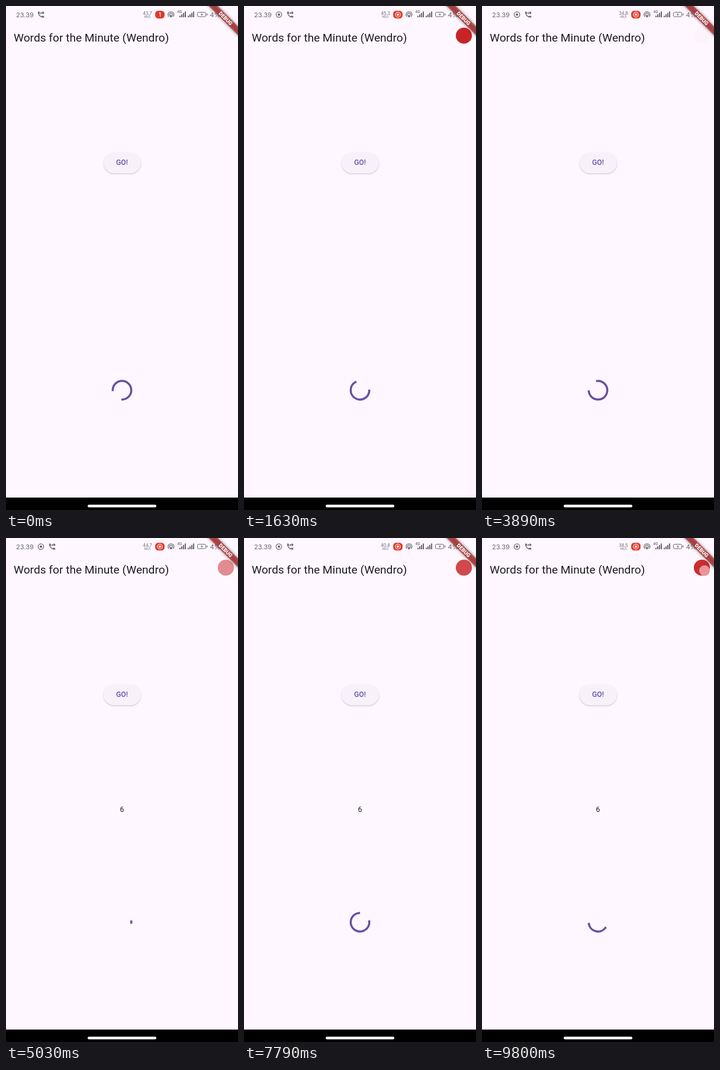
Write an HTML page that moves like this. It is 392 by 850 pixels and loops after 9.82 s.

```html
<!DOCTYPE html>
<html lang="en">
<head>
<meta charset="utf-8">
<title>Future demo</title>
<style>
  html, body { margin: 0; width: 100%; height: 100%; overflow: hidden; background: #fef7ff; }
  svg { display: block; width: 392px; height: 850px; font-family: Roboto, sans-serif; }
  .status { font-family: Inter, sans-serif; fill: #6a666e; }
  .line { fill: none; stroke: #6a666e; }
</style>
</head>
<body>
<svg viewBox="0 0 392 850">
  <defs>
    <filter id="blur" x="-50%" y="-100%" width="200%" height="300%"><feGaussianBlur stdDeviation="2.6"/></filter>
    <filter id="soft" x="-20%" y="-20%" width="140%" height="150%"><feGaussianBlur stdDeviation="0.8"/></filter>
  </defs>
  <rect width="392" height="850" fill="#fef7ff"/>

  <g class="status">
    <text x="17" y="19" font-size="11">23.39</text>
    <g id="rec">
      <circle class="line" cx="59" cy="14.5" r="4.7" stroke-width="1.2"/>
      <circle cx="59" cy="14.5" r="2.1"/>
    </g>
    <g id="phone">
      <path class="line" d="M-4.4 -4.2 C-4.2 0.8 -0.8 4.2 4.4 4.4" stroke-width="1.6"/>
      <path d="M-5.2 -5 h2.7 l.7 3 -1.9 1.4z M5.2 5.1 v-2.7 l-3 -.7 -1.4 1.9z"/>
      <path class="line" d="M-.2 -.8 V-3 H4.6 M2.8 -5 L4.9 -3 2.8 -1" stroke-width="1.3"/>
    </g>
    <text id="speed" x="239" y="15.4" font-size="7.4" text-anchor="middle"></text>
    <text x="239" y="20.3" font-size="4.6" text-anchor="middle">KB/S</text>

    <rect x="252" y="8" width="16" height="13" rx="5.5" fill="#df3a2a"/>
    <text id="count" x="260" y="18" font-size="9" font-weight="600" text-anchor="middle" fill="#fff">1</text>
    <g id="ring" fill="none" stroke="#fff">
      <circle cx="260" cy="14.5" r="4.2" stroke-width="1.1"/>
      <circle cx="260" cy="14.5" r="1.9" fill="#fff" stroke="none"/>
    </g>

    <g class="line" stroke-width="1.1">
      <path d="M275.2 18.2 A5.1 5.1 0 1 1 282.4 18.2"/>
      <path d="M276.8 16.6 A2.8 2.8 0 1 1 280.8 16.6"/>
    </g>
    <path d="M278.8 13.6 l2.2 5.2 h-4.4z"/>

    <text x="289.5" y="12" font-size="5.5" font-weight="600">4G</text>
    <g id="bars"></g>

    <rect class="line" x="323.5" y="10.5" width="14" height="7.5" rx="2" stroke-width="1"/>
    <path d="M339 12.6 h1.2 v3.4 h-1.2z M331.6 11.4 l-2.6 3.3 h1.7 l-.6 2.5 2.7 -3.4 h-1.8z"/>
    <text x="344.5" y="19" font-size="11">4%</text>
  </g>

  <text x="13" y="60" font-size="19.15" fill="#1d1b20">Words for the Minute (Wendro)</text>

  <rect x="165" y="248.4" width="63" height="34.8" rx="17.4" fill="#b9b2c2" opacity=".7" filter="url(#soft)"/>
  <rect x="165" y="247" width="63" height="35" rx="17.5" fill="#f7f2fa"/>
  <text x="196" y="268.4" font-size="12.2" font-weight="500" text-anchor="middle" fill="#6750a4">GO!</text>

  <text id="result" x="196" y="462.4" font-size="12.2" text-anchor="middle" fill="#1d1b20">6</text>
  <path id="arc" fill="none" stroke="#6750a4" stroke-width="3.5" stroke-linecap="square"/>

  <circle id="dot" cx="371.5" cy="50" r="13.6" fill="#c4161a"/>
  <circle id="touch" cx="376" cy="55" r="9" fill="#ea959a"/>

  <g transform="translate(392 0) rotate(45)">
    <rect x="-40" y="24.4" width="80" height="10.4" fill="#000" opacity=".5" filter="url(#blur)"/>
    <rect x="-40" y="24.4" width="80" height="10.4" fill="#b71c1c" fill-opacity=".63"/>
    <text y="32.7" font-size="8.9" font-weight="900" text-anchor="middle" fill="#fff">DEBUG</text>
  </g>

  <rect y="829" width="392" height="21" fill="#000"/>
  <rect x="138" y="841" width="116" height="4.4" rx="2.2" fill="#fff"/>
</svg>
<script>
  const LOOP = 9820;
  const $ = id => document.getElementById(id);
  const clamp = x => Math.min(1, Math.max(0, x));
  const show = (id, on) => $(id).setAttribute('opacity', +on);

  // Progress of the spinner, in cycles, at given times
  const pace = [[0, .42], [810, .9], [2410, 1.691], [3890, 2.456], [6170, 3.643], [7790, 4.514], [9820, 5.688]];
  const speeds = [[0, '43,7'], [700, '45,3'], [2900, '34,8'], [5000, '44,7'], [7100, '40,8'], [9200, '38,5']];

  for (const x0 of [293, 307]) {
    for (let i = 0; i < 4; i++) {
      const h = 2.5 + i * 2.4;
      $('bars').innerHTML += `<rect x="${x0 + i * 3}" y="${19 - h}" width="2" height="${h}"/>`;
    }
  }

  // cubic-bezier(.4, 0, .2, 1)
  function ease(x) {
    if (x <= 0 || x >= 1) return clamp(x);
    let lo = 0, hi = 1, s;
    for (let i = 0; i < 24; i++) {
      s = (lo + hi) / 2;
      const bx = 1.2 * s * (1 - s) ** 2 + .6 * s * s * (1 - s) + s ** 3;
      if (bx < x) lo = s; else hi = s;
    }
    return 3 * s * s * (1 - s) + s ** 3;
  }

  function cycles(t) {
    const i = pace.findIndex(([time]) => time > t);
    const [t0, u0] = pace[i - 1], [t1, u1] = pace[i];
    return u0 + (u1 - u0) * (t - t0) / (t1 - t0);
  }

  function drawArc(u) {
    const n = Math.floor(u), p = u - n;
    const head = ease(p * 2), tail = ease(p * 2 - 1);
    const start = 181 + 306 * (u - .42) + 270 * (n + tail);
    const sweep = Math.max(.1, 270 * (head - tail));
    const point = deg => {
      const a = deg * Math.PI / 180;
      return `${(196 + 15.7 * Math.cos(a)).toFixed(3)} ${(648 + 15.7 * Math.sin(a)).toFixed(3)}`;
    };
    $('arc').setAttribute('d', `M${point(start)} A15.7 15.7 0 ${+(sweep > 180)} 1 ${point(start + sweep)}`);
  }

  function render(t) {
    drawArc(cycles(t));
    $('speed').textContent = speeds.filter(([time]) => time <= t).pop()[1];

    const slide = ease(clamp((t - 500) / 250));
    $('phone').setAttribute('transform', `translate(${59 + 19 * slide} 14.5)`);
    show('rec', clamp((t - 820) / 200));
    show('count', t < 450);
    show('ring', t >= 450);

    const pulse = .5 + .5 * Math.cos((t - 6150) / 890 * 2 * Math.PI);
    show('dot', t < 450 ? 0 : pulse);
    show('touch', t >= 9700);
    show('result', t >= 5000);
  }

  function tick() {
    render(performance.now() % LOOP);
    requestAnimationFrame(tick);
  }
  tick();
</script>
</body>
</html>
```
